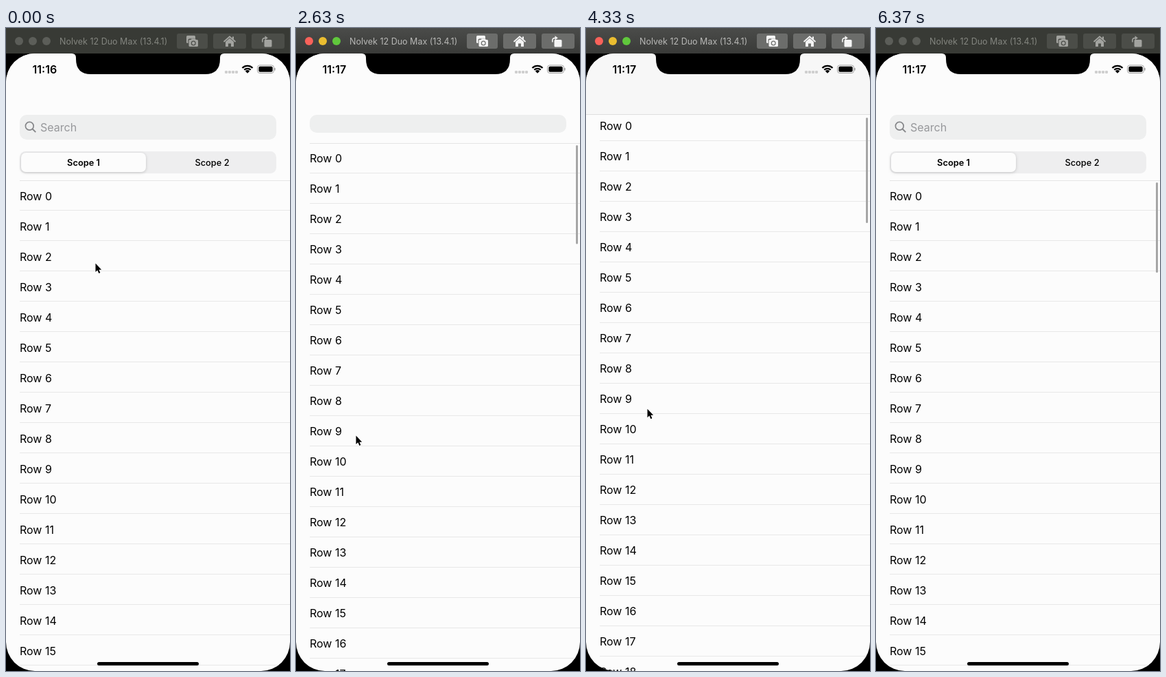
Recreate the animation shown at these times as an HTML page with a canvas. Size 414x933 px, loop 7370 ms.

```html
<!DOCTYPE html>
<html lang="en">
<head>
<meta charset="utf-8">
<title>Collapsing search bar</title>
<style>
html, body { margin: 0; width: 100%; height: 100%; overflow: hidden; background: #000; }
canvas { display: block; width: 414px; height: 933px; }
</style>
</head>
<body>
<canvas id="stage"></canvas>
<script>
const W = 414, H = 933, LOOP = 7370, BAR = 37;
const NAV_OPEN = 221, NAV_CLOSED = 126, SCOPE_H = 44, ROW_H = 44;
const PAPER = '#fcfcfc';

const canvas = document.getElementById('stage');
const g = canvas.getContext('2d');
const dpr = window.devicePixelRatio || 1;
canvas.width = W * dpr;
canvas.height = H * dpr;

// [time, value] pairs
const scrollKeys = [[2035, 0], [2594, 54], [3089, 115], [3500, 158], [3830, 140.5], [4360, 97], [4737, 15.5], [5066, 0]];
const pointerX = [[283, 130], [940, 80], [1232, 80], [1816, 84], [2035, 84], [2594, 87], [3830, 89], [5066, 89], [5561, 430]];
const pointerY = [[283, 341], [940, 395], [1232, 395], [1816, 655], [2035, 655], [2594, 591], [3089, 531], [3500, 495],
  [3830, 515], [4360, 556], [4737, 638], [5066, 655], [5561, 640]];

// Monotone cubic interpolation: smooth, without overshoot
function track(keys, t) {
  const last = keys.length - 1;
  if (t <= keys[0][0]) return keys[0][1];
  if (t >= keys[last][0]) return keys[last][1];
  const i = keys.findIndex(k => k[0] > t) - 1;
  const slope = j => (keys[j + 1][1] - keys[j][1]) / (keys[j + 1][0] - keys[j][0]);
  const tangent = j => {
    if (j === 0 || j === last) return 0;
    const a = slope(j - 1), b = slope(j);
    return a * b <= 0 ? 0 : 2 * a * b / (a + b);
  };
  const [t0, v0] = keys[i], [t1, v1] = keys[i + 1];
  const d = t1 - t0, u = (t - t0) / d, w = 1 - u;
  return v0 * (1 + 2 * u) * w * w + v1 * (3 - 2 * u) * u * u
    + d * (tangent(i) * u * w * w - tangent(i + 1) * u * u * w);
}

function stepTime(t) {
  const [base, step] = t < 2100 ? [1305, 73] : [2100, 82.4];
  return base + step * Math.floor((t - base) / step);
}

const clamp01 = v => Math.max(0, Math.min(1, v));

function box(x, y, w, h, r, fill) {
  g.beginPath();
  g.roundRect(x, y, w, h, r);
  g.fillStyle = fill;
  g.fill();
}

function disc(x, y, r, fill) {
  g.beginPath();
  g.arc(x, y, r, 0, 2 * Math.PI);
  g.fillStyle = fill;
  g.fill();
}

function shape(d, fill) {
  g.fillStyle = fill;
  g.fill(new Path2D(d));
}

function line(d, color, width) {
  g.strokeStyle = color;
  g.lineWidth = width;
  g.stroke(new Path2D(d));
}

function text(str, x, y, size, weight, color) {
  g.font = `${weight} ${size}px Inter, sans-serif`;
  g.fillStyle = color;
  g.fillText(str, x, y);
}

function clipped(x, y, w, h, r, draw) {
  g.save();
  g.beginPath();
  g.roundRect(x, y, w, h, r);
  g.clip();
  draw();
  g.restore();
}

function drawTitleBar(active) {
  let back = '#383a35';
  if (active) {
    back = g.createLinearGradient(0, 0, 0, BAR);
    back.addColorStop(0, '#4b4c4a');
    back.addColorStop(1, '#393a38');
  }
  g.fillStyle = back;
  g.fillRect(0, 0, W, BAR);
  const lights = active ? ['#f9625a', '#eabd30', '#60c83c'] : Array(3).fill('#5c5e59');
  lights.forEach((c, i) => disc(19 + 20 * i, 19, 6, c));
  text('Nolvek 12 Duo Max (13.4.1)', 78, 24, 12.5, 400, active ? '#b8b8b6' : '#83857f');

  const button = active ? '#6c6d6b' : '#4b4d48';
  const icon = active ? '#f4f4f4' : '#a2a39f';
  [[249, 45], [302, 48], [358, 48]].forEach(([x, w]) => box(x, 8, w, 22, 3, button));

  // Screenshot
  box(263, 11, 13, 11, 1.5, icon);
  box(265.5, 15.5, 15.5, 12.5, 2, button);
  box(266.5, 17, 13.5, 10, 1.5, icon);
  box(270, 15.5, 6.5, 3, 1, icon);
  disc(273.2, 22, 3.5, button);
  disc(273.2, 22, 2.3, icon);

  // Home
  line('M317.5 20 L326 12.5 L334.5 20', icon, 1.8);
  shape('M320 20 L326 14.8 L332 20 V27 H328 V22.5 H324 V27 H320 Z M330 12.5 H332 V17 L330 15.2 Z', icon);

  // Rotate
  box(376.5, 17, 11, 10.5, 1.5, icon);
  line('M373.8 20.5 V18 Q373.8 14.5 378 14.5', icon, 1.6);
  shape('M377.5 11.3 L381.8 14.5 L377.5 17.5 Z', icon);
}

function drawStatus(t) {
  text(t < 2035 ? '11:16' : '11:17', 38.5, 65.5, 16, 600, '#000');
  for (let i = 0; i < 4; i++) box(319 + 5 * i, 62, 4, 4, 1.2, '#cfcfcf');

  // Wi-Fi arcs share one centre
  g.strokeStyle = '#000';
  [[10.6, 2.4], [6.7, 2.3]].forEach(([r, w]) => {
    g.beginPath();
    g.arc(352, 65.5, r, -Math.PI * 0.75, -Math.PI * 0.25);
    g.lineWidth = w;
    g.stroke();
  });
  shape('M352 65.8 L348.8 62.4 Q352 59.6 355.2 62.4 Z', '#000');

  g.beginPath();
  g.roundRect(366.5, 54, 24, 11.5, 3.4);
  g.lineWidth = 1;
  g.strokeStyle = '#a0a0a0';
  g.stroke();
  box(368.3, 55.8, 20.4, 7.9, 2, '#000');
  box(391.3, 57.8, 1.4, 4, 0.7, '#a0a0a0');
}

function drawNav(scroll, bottom) {
  const collapsed = bottom <= NAV_CLOSED;
  g.fillStyle = collapsed ? '#f7f7f7' : PAPER;
  g.fillRect(0, BAR, W, bottom - BAR);

  clipped(0, BAR, W, bottom - BAR, 0, () => {
    const fieldH = Math.min(36, 36 + SCOPE_H - scroll);
    if (fieldH > 0) {
      box(20, 126, 374, fieldH, Math.min(10, fieldH / 2), '#eeefef');
      g.globalAlpha = clamp01((fieldH - 28) / 8);
      g.beginPath();
      g.arc(34.3, 142.2, 5.9, 0, 2 * Math.PI);
      g.lineWidth = 1.7;
      g.strokeStyle = '#86878a';
      g.stroke();
      line('M38.6 146.5 L43.3 151.2', '#86878a', 1.9);
      text('Search', 50, 149.5, 16, 400, '#97989b');
      g.globalAlpha = 1;
    }
    if (scroll < SCOPE_H) {
      box(20, 179, 374, 32, 8.5, '#eeeeef');
      g.save();
      g.shadowColor = 'rgba(0,0,0,.18)';
      g.shadowBlur = 4 * dpr;
      g.shadowOffsetY = dpr;
      box(22, 181, 182, 28, 7, PAPER);
      g.restore();
      g.textAlign = 'center';
      text('Scope 1', 113, 199.7, 12.8, 600, '#000');
      text('Scope 2', 300.5, 199.7, 12.8, 500, '#000');
      g.textAlign = 'left';
    }
  });

  const full = collapsed || (scroll > 0 && scroll < SCOPE_H);
  g.fillStyle = collapsed ? '#dedede' : '#e5e5e5';
  g.fillRect(full ? 0 : 20, Math.round(bottom) - (full ? 1 : 0), W, 1);
}

function drawRows(scroll, top) {
  clipped(0, top, W, H - top, 0, () => {
    for (let i = 0; i < 21; i++) {
      const y = NAV_OPEN - scroll + ROW_H * i;
      text('Row ' + i, 20, y + 28.5, 16, 400, '#000');
      g.fillStyle = '#e8e8e8';
      g.fillRect(20, Math.round(y + ROW_H - 1), W, 1);
    }
  });
}

function drawScrollbar(scroll, navBottom) {
  const open = Math.min(scroll, NAV_OPEN - NAV_CLOSED);
  const y = navBottom + 3 + 0.16 * (scroll - open);
  box(408, y, 3, 131 + open * 22 / 95, 1.5, '#a6a6a6');
}

function drawPointer(t) {
  const x = track(pointerX, t), y = track(pointerY, t);
  if (t >= 1880 && t < 2030) {
    g.globalAlpha = 1 - (t - 1889) / 150;
    disc(x, y + 4, 16, '#fa8c87');
    g.globalAlpha = 1;
  }
  g.save();
  g.translate(x, y);
  const arrow = 'M0.5 0.5 V13 L3.3 10.4 L5.4 15 L7.4 14.1 L5.4 9.7 H9.2 Z';
  line(arrow, '#fff', 1.6);
  shape(arrow, '#000');
  g.restore();
}

function drawScreen(t) {
  const scroll = track(scrollKeys, t);
  const navBottom = Math.max(NAV_CLOSED, NAV_OPEN - scroll);
  clipped(0, BAR, W, H - BAR, 42, () => {
    g.fillStyle = PAPER;
    g.fillRect(0, BAR, W, H - BAR);
    drawRows(scroll, navBottom);
    drawNav(scroll, navBottom);
    drawStatus(t);
    if (t >= 2035) drawScrollbar(scroll, navBottom);
    shape('M96 37 Q102 37 102 43 V45 Q102 67 124 67 H290 Q312 67 312 45 V43 Q312 37 318 37 Z', '#000');
    box(133, 920, 148, 5, 2.5, '#000');
  });
}

function render() {
  const time = performance.now() % LOOP;
  const t = stepTime(time);
  g.setTransform(dpr, 0, 0, dpr, 0, 0);
  g.fillStyle = '#000';
  g.fillRect(0, 0, W, H);
  drawTitleBar(time >= 90 && time < 6370);
  drawScreen(t);
  drawPointer(t);
  requestAnimationFrame(render);
}
render();
</script>
</body>
</html>
```
